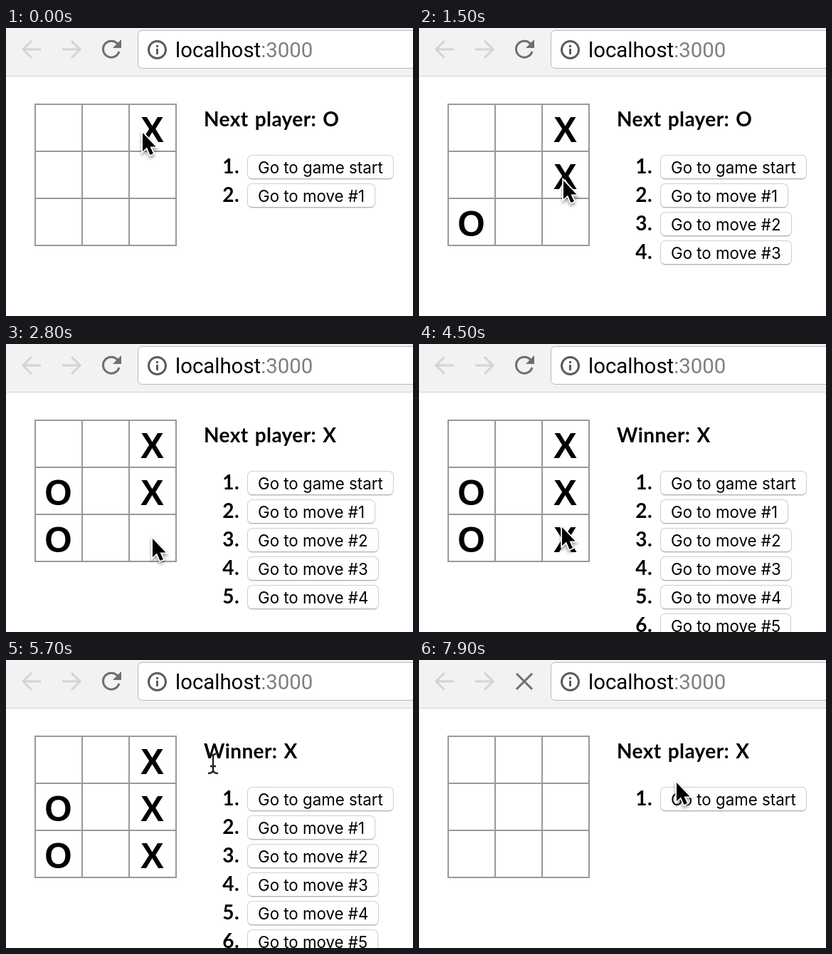
An HTML page that plays this animation: 572 by 404 pixels, repeating every 8 s.

```html
<!DOCTYPE html>
<html lang="en">
<head>
<meta charset="utf-8">
<title>Tic-tac-toe</title>
<style>
  html, body { margin: 0; width: 100%; height: 100%; overflow: hidden; background: #fff; }
  svg, ol { position: absolute; left: 0; top: 0; margin: 0; padding: 0; }
  .lato, li { font: 700 28px Lato, sans-serif; letter-spacing: .4px; word-spacing: 2px; }
  .mark { font: 700 49.4px "Liberation Sans", Arial, sans-serif; text-anchor: middle; }
  .url { font: 29.4px Roboto, sans-serif; }
  .icon { stroke: #6e6e6e; stroke-width: 3; }
  li { position: absolute; left: 339px; height: 34px; list-style: none; white-space: nowrap; }
  li b { position: absolute; right: 100%; margin-right: 11px; line-height: 31px; }
  li span {
    display: block; box-sizing: border-box; height: 34px; padding: 1px 14px 0;
    border: 1px solid #cfcfcf; border-bottom-color: #b0b0b0; border-radius: 7px;
    box-shadow: 0 1px 1px rgba(0, 0, 0, .12);
    font: 400 22.3px/31px Inter, sans-serif; letter-spacing: 0; word-spacing: 0;
  }
  #arrow { filter: drop-shadow(0 3px 2px rgba(0, 0, 0, .4)); }
</style>
</head>
<body>
<svg width="572" height="404" fill="none">
  <path fill="#f2f2f2" d="M0 0H572V67H0z"/>
  <path stroke="#d2d2d2" d="M0 67.5H572"/>
  <rect x="185.5" y="3.5" width="400" height="53" rx="6" fill="#fff" stroke="#b8b8b8"/>
  <g stroke="#d4d4d4" stroke-width="3">
    <path id="back" d="M49 30H25M36 18L24 30L36 42"/>
    <use href="#back" transform="matrix(-1 0 0 1 128 0)"/>
  </g>
  <g id="reload" class="icon">
    <path d="M157 22.5A11.5 11.5 0 1 0 159 33"/>
    <path fill="#6e6e6e" stroke="none" d="M162 16V28H150z"/>
  </g>
  <path id="stop" class="icon" d="M137 19L159 41M159 19L137 41"/>
  <g stroke="#5c5c5c" stroke-width="3">
    <circle cx="212.5" cy="30.5" r="12"/>
    <path d="M212.5 29V37M212.5 24V27"/>
  </g>
  <text class="url" x="238" y="41" fill="#000">localhost<tspan fill="#808080">:3000</tspan></text>
  <g id="grid" stroke="#999" stroke-width="2"></g>
  <text id="status" class="lato" x="278" y="138" fill="#000"></text>
  <g id="marks" class="mark" fill="#000"></g>
</svg>
<ol id="list"></ol>
<svg width="572" height="404">
  <g id="cursor">
    <path id="arrow" stroke="#fff" stroke-width="3.5" paint-order="stroke"
      d="M0 0V26L6 20.5L10.5 31L15 29L10.5 19.5H18.5z"/>
    <path id="beam" fill="none" stroke="#222" stroke-width="2.4"
      d="M-7 -14Q0 -14 0 -9V9Q0 14 -7 14M7 -14Q0 -14 0 -9M0 9Q0 14 7 14M-4 4H4"/>
  </g>
</svg>
<script>
const $ = id => document.getElementById(id);
const LOOP = 8000, STEP = 100, STOP = 7600, RESET = 7800;
const CELL = 66, ROW = 40, GLIDE = 400;

// [time, cell]; X and O alternate
const moves = [[0, 2], [600, 6], [1400, 5], [2300, 3], [3800, 8]];

// [departure time, x, y]; the pointer glides to each place in turn and rests there
const stops = [
  [-GLIDE, 192, 147], [200, 76, 272], [600, 218, 244], [1000, 203, 214], [1600, 91, 195],
  [2400, 206, 273], [2900, 201, 257], [4500, 222, 150], [5300, 291, 145], [5800, 362, 172]
];

const ease = u => u * u * (3 - 2 * u);
const player = n => n % 2 ? "O" : "X";
const show = (el, on) => el.style.display = on ? "" : "none";
const showFirst = (id, n) => [...$(id).children].forEach((el, i) => show(el, i < n));

function pointer(t) {
  let [, x, y] = stops[0];
  for (const [depart, toX, toY] of stops) {
    const k = ease(Math.min(1, Math.max(0, (t - depart) / GLIDE)));
    x += (toX - x) * k;
    y += (toY - y) * k;
  }
  return [x, y];
}

$("grid").innerHTML = [0, 1, 2, 3].map(i =>
  `<path d="M40 ${107 + i * CELL}h200M${41 + i * CELL} 106v200"/>`).join("");
$("marks").innerHTML = moves.map(([, c], i) =>
  `<text x="${73.5 + c % 3 * CELL}" y="${160 + Math.floor(c / 3) * CELL}">${player(i)}</text>`).join("");
$("list").innerHTML = [0, ...moves].map((_, i) =>
  `<li style="top:${178 + i * ROW}px"><b>${i + 1}.</b><span>Go to ${i ? "move #" + i : "game start"}</span></li>`).join("");

function draw(now) {
  const t = Math.floor(now % LOOP / STEP) * STEP;
  const count = t < RESET ? moves.filter(m => m[0] <= t).length : 0;
  showFirst("marks", count);
  showFirst("list", count + 1);
  $("status").textContent = count === moves.length ? "Winner: X" : "Next player: " + player(count);

  show($("reload"), t < STOP);
  show($("stop"), t >= STOP);

  const [x, y] = pointer(t), overText = x > 278 && y < 162;
  $("cursor").setAttribute("transform", `translate(${x} ${y})`);
  show($("arrow"), !overText);
  show($("beam"), overText);
}

const start = performance.now();
function tick() {
  draw(performance.now() - start);
  requestAnimationFrame(tick);
}
tick();
</script>
</body>
</html>
```
